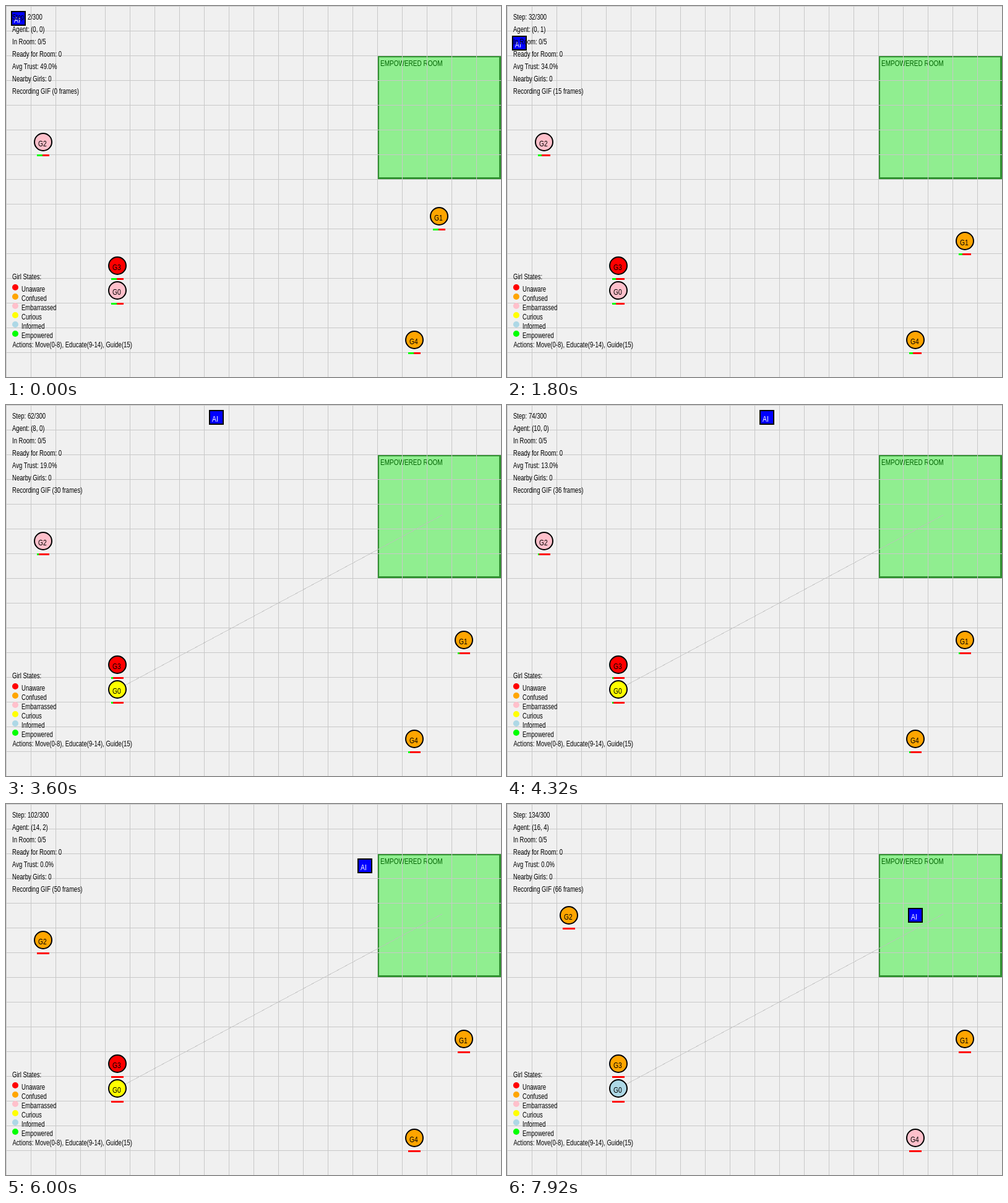
An HTML page for the animation above (8 s loop, 800x600 px).

```html
<!DOCTYPE html>
<html lang="en">
<head>
<meta charset="utf-8">
<title>Grid world</title>
<style>
  html, body { margin: 0; width: 100%; height: 100%; overflow: hidden; background: #f0f0f0; }
  svg { display: block; width: 800px; height: 600px; }
  text { font-family: "Liberation Sans", Arial, sans-serif; white-space: pre; }
</style>
</head>
<body>
<svg id="stage" viewBox="0 0 800 600"></svg>
<script>
const LOOP = 8000, TICK = 120, CELL = 40;
const stage = document.getElementById('stage');
const RED = '#ff0000', ORANGE = '#ffa500', PINK = '#ffc0cb',
      YELLOW = '#ffff00', BLUE = '#add8e6', GREEN = '#00ff00';

function add(tag, attrs, parent = stage) {
  const el = document.createElementNS('http://www.w3.org/2000/svg', tag);
  for (const name in attrs) el.setAttribute(name, attrs[name]);
  parent.appendChild(el);
  return el;
}

function rect(x, y, width, height, fill, parent) {
  return add('rect', { x, y, width, height, fill }, parent);
}

// Narrow lettering, the same for every label
function label(x, y, str, fill = '#000', size = 12, parent = stage) {
  const el = add('text', {
    transform: `translate(${x} ${y}) scale(.795 1)`, 'font-size': size, fill
  }, parent);
  el.textContent = str;
  return el;
}

const mid = cell => cell * CELL + CELL / 2;
const place = (el, [col, row]) =>
  el.setAttribute('transform', `translate(${mid(col)} ${mid(row)})`);

// Latest value in a list of [tick, value]
const latest = (list, k) => list.filter(([at]) => at <= k).pop()[1];

// Room, with the grid over it
rect(600, 80, 200, 200, '#309030');
rect(603, 83, 194, 194, '#90ee90');
label(605, 97, 'EMPOWERED ROOM', '#006400', 12.6);
for (let x = 0; x < 800; x += CELL) rect(x, 0, 1, 600, '#c8c8c8');
for (let y = 0; y < 600; y += CELL) rect(0, y, 800, 1, '#c8c8c8');

const guide = add('line', {
  x1: 180, y1: 460, x2: 705, y2: 178, stroke: '#bebebe',
  'stroke-opacity': .75, 'shape-rendering': 'crispEdges'
});

const CURIOUS_AT = 30;
const girls = [
  { pos: [[0, [4, 11]]], state: [[0, PINK], [CURIOUS_AT, YELLOW], [63, BLUE]] },
  { pos: [[0, [17, 8]], [4, [18, 9]]], state: [[0, ORANGE]] },
  { pos: [[0, [1, 5]], [55, [2, 4]]], state: [[0, PINK], [44, ORANGE]] },
  { pos: [[0, [4, 10]]], state: [[0, RED], [63, ORANGE]] },
  { pos: [[0, [16, 13]]], state: [[0, ORANGE], [65, PINK]] }
];
girls.forEach((girl, i) => {
  girl.el = add('g', {});
  girl.disc = add('circle', { r: 14, stroke: '#000', 'stroke-width': 2 }, girl.el);
  label(-8, 7, 'G' + i, '#000', 13, girl.el);
  rect(-10, 20, 20, 3, RED, girl.el);
  girl.bar = rect(-10, 20, 0, 3, GREEN, girl.el);
});

const agent = add('g', {});
rect(-12, -12, 24, 24, '#000', agent);
rect(-10, -10, 20, 20, '#0000ff', agent);
label(-7, 7, 'AI', '#fff', 13, agent);

// Agent route: tick, column, row
const route = [
  [0, 0, 0], [2, 0, 1], [5, 0, 0], [9, 0, 0], [10, 0, 1], [12, 0, 0], [14, 0, 0],
  [15, 0, 1], [19, 2, 1], [24, 6, 2], [28, 7, 0], [30, 8, 0], [33, 9, 1],
  [36, 10, 0], [39, 11, 1], [45, 12, 2], [50, 14, 2], [54, 14, 0], [58, 14, 0],
  [60, 14, 1], [66, 16, 4]
];
function agentCell(k) {
  const i = Math.max(1, route.findIndex(([at]) => at >= k));
  const [a, ...from] = route[i - 1], [b, ...to] = route[i];
  const f = (k - a) / (b - a);
  return from.map((v, n) => Math.round(v + (to[n] - v) * f));
}

const hud = Array.from({ length: 7 }, (_, i) => label(10, 22 + 20 * i, ''));

label(10, 442, 'Girl States:');
[['Unaware', RED], ['Confused', ORANGE], ['Embarrassed', PINK],
 ['Curious', YELLOW], ['Informed', BLUE], ['Empowered', GREEN]].forEach(([name, fill], i) => {
  add('circle', { cx: 15, cy: 455 + 15 * i, r: 5, fill });
  label(25, 462 + 15 * i, name);
});
label(10.5, 552, 'Actions: Move(0-8), Educate(9-14), Guide(15)');

function draw(ms) {
  const k = Math.floor((ms % LOOP) / TICK);
  const trust = Math.max(0, 49 - k);
  const cell = agentCell(k);
  place(agent, cell);
  for (const girl of girls) {
    place(girl.el, latest(girl.pos, k));
    girl.disc.setAttribute('fill', latest(girl.state, k));
    girl.bar.setAttribute('width', Math.floor(trust / 5));
  }
  guide.setAttribute('visibility', k >= CURIOUS_AT ? 'visible' : 'hidden');
  [
    `Step: ${2 * k + 2}/300`,
    `Agent: (${cell.join(', ')})`,
    'In Room: 0/5',
    'Ready for Room: 0',
    `Avg Trust: ${trust.toFixed(1)}%`,
    'Nearby Girls: 0',
    `Recording GIF (${k} frames)`
  ].forEach((str, i) => { hud[i].textContent = str; });
}

const start = performance.now();
function loop() {
  draw(performance.now() - start);
  requestAnimationFrame(loop);
}
loop();
</script>
</body>
</html>
```
